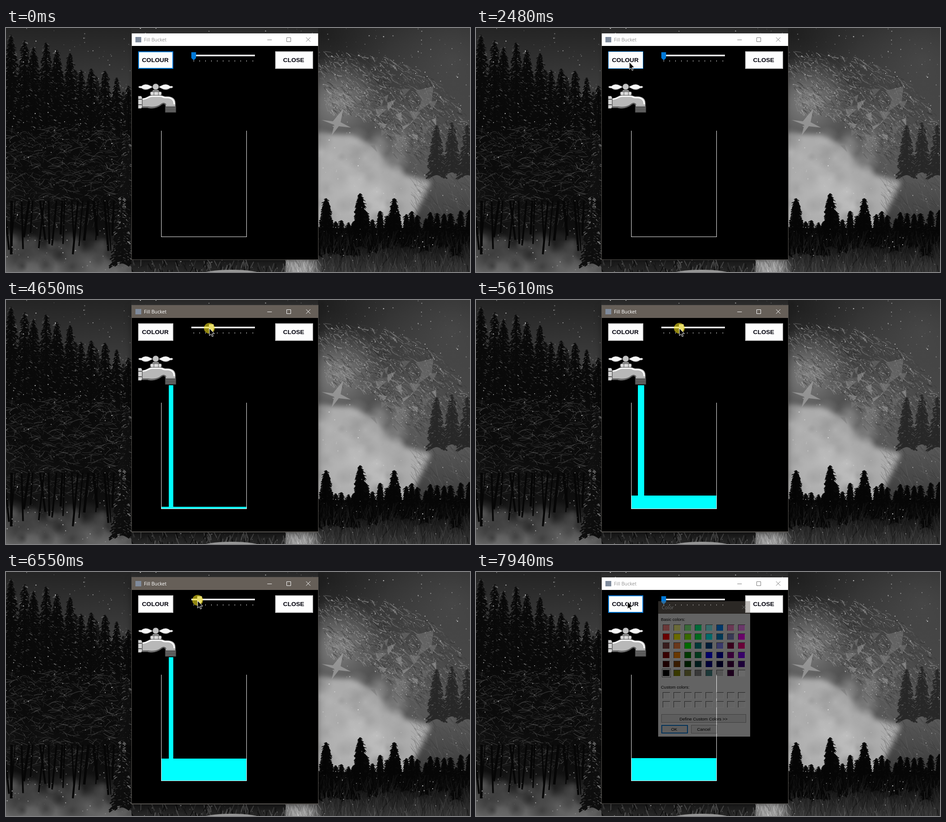
Recreate the animation shown at these times as an HTML page with a canvas. Size 1029 px wide and 544 px high, loop 8000 ms.

```html
<!DOCTYPE html>
<html lang="en">
<head>
<meta charset="utf-8">
<title>Fill Bucket</title>
<style>
html, body { margin: 0; width: 100%; height: 100%; overflow: hidden; background: #222; }
canvas, svg { position: absolute; left: 0; top: 0; width: 1029px; height: 544px; }
#shade { position: absolute; left: 278px; top: 12px; width: 414px; height: 504px; }
.cap { font: 10.7px "Open Sans", sans-serif; }
.btn { font: bold 13.6px "Liberation Sans", Arial, sans-serif; text-anchor: middle; fill: #00000c; }
.dlg { font: 9.5px "Liberation Sans", Arial, sans-serif; }
.mid { text-anchor: middle; }
.crisp { shape-rendering: crispEdges; }
</style>
</head>
<body>
<canvas id="scene" width="1029" height="544"></canvas>
<div id="shade"></div>
<svg viewBox="0 0 1029 544">
  <g class="crisp">
    <rect id="frame" x="278" width="415" fill="#55524e"/>
    <rect x="279" y="40" width="413" height="476"/>
    <rect id="bar" x="279" y="12" width="413" height="28"/>
  </g>
  <rect x="287" y="20" width="13" height="12" fill="#7f8b9c"/>
  <text id="title" class="cap" x="306" y="30">Fill Bucket</text>
  <path id="icons" fill="none" d="M579.5 26.5h10M622.5 21.5h9v9h-9zM665.5 21l9.5 9.5M675 21l-9.5 9.5"/>

  <g class="crisp">
    <rect x="293" y="52" width="78" height="39" fill="#fdfdfd"/>
    <rect id="edge" fill="none"/>
    <rect x="598" y="53" width="82" height="37" fill="#fdfdfd" stroke="#d2d2d2" stroke-width="2"/>
  </g>
  <text class="btn" x="331" y="76">COLOUR</text>
  <text class="btn" x="638" y="76">CLOSE</text>

  <rect x="411" y="59.5" width="141" height="3.6" fill="#e9e9ea"/>
  <path id="ticks" class="crisp" stroke="#c8c8c8"/>
  <path id="thumb" d="M-5 54H5.5V67L.25 72 -5 67Z"/>

  <g stroke="#2c2c2c" stroke-width=".8">
    <g id="lobe" fill="#f6f6f6">
      <path d="M293 131.5Q296 128 300 129.5Q309 122 320 128.5L326 131.5L320 134.5Q309 141 300 134Q296 135 293 131.5Z"/>
      <path d="M300 134Q309 138 320 134.5Q309 141 300 134Z" fill="#aaa" stroke="none"/>
    </g>
    <use href="#lobe" transform="matrix(-1 0 0 1 664 0)"/>
    <path d="M326 138h12l3 5h-18z" fill="#999"/>
    <circle cx="332" cy="131" r="7" fill="#c4c4c4"/>
    <path d="M302 157C312 157 314 151 322 150H343C348 150 350 153 356 152.5C370 152 376 158 376 168V176H354C354 169 349 167 344 172C334 180 320 180 314 178H302Z" fill="#b8b8b8"/>
    <path d="M303 158.500C314 158 316 152.500 324 152H342C348 153 350 156 356 155C367 155 373 160 373 170" fill="none" stroke="#fff" stroke-width="3"/>
    <path d="M303 176H315C326 178 338 176 344 170Q350 165 355 171" fill="none" stroke="#555" stroke-width="2"/>
    <rect x="320" y="142" width="25" height="8" rx="2" fill="#dcdcdc"/>
    <path d="M328 142v8M338 142v8"/>
    <path d="M293 151.5h7l2 4v21l-2 3h-7z" fill="#d4d4d4"/>
    <path d="M293 159h8M293 171h8" stroke-width="1.5"/>
    <rect x="353" y="175" width="24" height="13" fill="#808080"/>
    <path d="M353 178h24M353 181.5h24M353 185h24" stroke-width="1.3"/>
  </g>

  <g class="crisp">
    <path d="M344.5 229V465.5H533.5V229" fill="none" stroke="#f0f0f0"/>
    <rect id="water" x="345" width="188" fill="#0ff"/>
    <rect id="stream" y="190" fill="#0ff"/>
  </g>

  <g id="dialog">
    <rect class="crisp" x="404" y="65" width="204" height="302" fill="#f0f0f0"/>
    <rect class="crisp" x="404" y="65" width="204" height="28" fill="#68625a"/>
    <text class="cap" x="412" y="83" fill="#fff">Color</text>
    <path d="M590 74.5l8 8M598 74.5l-8 8" stroke="#fff"/>
    <text class="dlg" x="410" y="109">Basic colors:</text>
    <text class="dlg" x="410" y="260">Custom colors:</text>
    <g id="swatches" class="crisp"></g>
    <rect class="crisp" x="412.5" y="215.5" width="19" height="19" fill="none" stroke="#000" stroke-dasharray="1 1"/>
    <g fill="#e1e1e1" stroke="#999">
      <rect x="411.5" y="317.5" width="187" height="18"/>
      <rect x="412" y="342" width="57" height="17" stroke="#0078d7" stroke-width="2"/>
      <rect x="477.5" y="341.5" width="57" height="18"/>
    </g>
    <g class="dlg mid">
      <text x="504.5" y="330.5">Define Custom Colors &gt;&gt;</text>
      <text x="439.5" y="354">OK</text>
      <text x="505" y="354">Cancel</text>
    </g>
  </g>

  <circle id="press" r="12" fill="rgb(255,236,30)" fill-opacity=".57"/>
  <path id="cursor" d="M0 0V16.5L3.7 13 6.2 18.7 8.7 17.6 6.2 12.1H11.3Z" stroke="#fff"/>
</svg>
<script>
const $ = id => document.getElementById(id);
const set = (id, attrs) => {
  for (const k in attrs) $(id).setAttribute(k, attrs[k]);
};
const show = (id, on) => { $(id).style.display = on ? '' : 'none'; };

// ---------- wallpaper ----------
const g = $('scene').getContext('2d');
let seed = 11;
function rnd(a = 0, b = 1) {
  seed = (seed + 0x6D2B79F5) | 0;
  let r = Math.imul(seed ^ seed >>> 15, 1 | seed);
  r = r + Math.imul(r ^ r >>> 7, 61 | r) ^ r;
  return a + (b - a) * ((r ^ r >>> 14) >>> 0) / 4294967296;
}
const gray = (v, a = 1) => `rgba(${v | 0},${v | 0},${v | 0},${a})`;
const times = (n, fn) => { for (let i = 0; i < n; i++) fn(i); };

function fade(x, y, w, h, tones) {
  const f = g.createLinearGradient(0, y, 0, y + h);
  tones.forEach((v, i) => f.addColorStop(i / (tones.length - 1), gray(v)));
  g.fillStyle = f;
  g.fillRect(x, y, w, h);
}
function glow(x, y, r, v, a) {
  const f = g.createRadialGradient(x, y, 0, x, y, r);
  f.addColorStop(0, gray(v, a));
  f.addColorStop(1, gray(v, 0));
  g.fillStyle = f;
  g.fillRect(x - r, y - r, 2 * r, 2 * r);
}
function line(x, y, dx, dy, bend, style, w) {
  g.strokeStyle = style;
  g.lineWidth = w;
  g.beginPath();
  g.moveTo(x, y);
  g.quadraticCurveTo(x + dx / 2, y + dy / 2 + bend, x + dx, y + dy);
  g.stroke();
}
function poly(pts, style) {
  g.fillStyle = style;
  g.beginPath();
  for (let i = 0; i < pts.length; i += 2) g.lineTo(pts[i], pts[i + 1]);
  g.fill();
}
function dot(x, y, r, style) {
  g.fillStyle = style;
  g.beginPath();
  g.arc(x, y, r, 0, 7);
  g.fill();
}
// dark drooping boughs with flecks of snow up to tone hi
function fir(x, top, h, w, lo, hi) {
  poly([x, top, x + w * .7, top + h, x - w * .7, top + h], gray(lo));
  for (let y = 0; y < h; y += 2) {
    const half = 1.5 + w * Math.pow(y / h, .65) * rnd(.5, 1.05);
    for (const s of [-1, 1]) {
      line(x, top + y, s * half, half * .5, -half * .15, gray(lo), 3);
      const k = rnd(.05, .85), v = lo + (hi - lo) * rnd() ** 1.6;
      line(x + s * half * k, top + y + half * k * .4, s * rnd(2, 7), rnd(1, 6), -1, gray(v), rnd(.8, 2));
    }
  }
}

function paintForest() {
  fade(0, 0, 620, 544, [36, 56, 72, 30, 22, 26]);
  times(12, i => fir(110 + i * 15, 95 + i * 4 + rnd(-15, 20), 190, 26, 18, 90));
  times(11, i => {
    const x = 268 - i * 25.5 + rnd(-4, 4);
    fir(x, Math.max(6, 12 + x * .42 + rnd(-18, 18)), 290, 40, 10, 112);
  });
  times(50, () => glow(rnd(0, 250), rnd(270, 430), 55, 12, .55));
  times(750, () => line(rnd(0, 255), rnd(225, 440), rnd(-28, 28), rnd(-16, 12), rnd(-9, 5),
    gray(rnd(45, 135), .6), rnd(.4, 1)));
  fade(0, 474, 278, 70, [26, 66, 92, 104]);
  times(60, () => glow(rnd(0, 270), rnd(470, 544), rnd(10, 35), rnd(10, 140), .4));
  times(22, i => line(i * 12 + rnd(-5, 5), 385, rnd(-12, 12), rnd(70, 120), 0, gray(6), rnd(2, 6)));
  fir(268, 235, 150, 22, 16, 135);
  fir(257, 375, 150, 27, 14, 190);
  fade(278, 516, 345, 28, [22, 40]);
  times(110, () => line(rnd(278, 620), rnd(514, 540), rnd(-8, 8), 14, 0, gray(rnd(8, 85)), 2));
  g.fillStyle = gray(150);
  g.beginPath();
  g.ellipse(500, 549, 65, 10, 0, 0, 7);
  g.fill();
}

function paintNight() {
  fade(620, 0, 409, 544, [48, 60, 72, 88, 62, 40]);
  glow(700, 10, 150, 22, .7);
  glow(990, 70, 150, 92, .4);
  glow(735, 165, 105, 165, .65);
  glow(890, 230, 100, 112, .5);
  // swirling fur, brightest at its left end
  times(1300, () => {
    const a = rnd(-1.75, 0), r = 160 + rnd(-65, 75), far = (a + 1.75) / 1.75;
    const x = 735 + r * Math.cos(a) * 1.3, y = 285 + r * Math.sin(a);
    line(x, y, rnd(4, 16), rnd(2, 14), rnd(-4, 3), gray(rnd(30, 215 - 75 * far), .45), rnd(.5, 2));
    if (rnd() < .5) dot(x + rnd(-9, 9), y + rnd(-9, 9), rnd(.3, 1.2), gray(rnd(130, 225), .7));
  });
  g.filter = 'blur(6px)';
  poly([670, 235, 765, 238, 822, 268, 862, 322, 942, 342, 925, 380, 890, 450, 670, 450], gray(172));
  g.filter = 'none';
  times(80, () => glow(rnd(690, 880), rnd(245, 430), rnd(10, 32), rnd(115, 215), .35));
  glow(775, 365, 85, 195, .55);
  poly([700, 205, 725, 208, 748, 180, 742, 210, 765, 222, 738, 219, 722, 240, 728, 216], gray(165, .7));
  poly([908, 140, 948, 130, 944, 165, 912, 188, 922, 160], gray(115, .6));
  times(22, () => {
    const x = rnd(800, 945), y = rnd(120, 310);
    poly([x, y, x + rnd(6, 26), y + rnd(-9, 9), x + rnd(0, 16), y + rnd(7, 22)], gray(rnd(90, 175), .5));
  });
  times(300, () => line(rnd(895, 1020), rnd(235, 400), rnd(5, 24), rnd(8, 28), -3, gray(rnd(35, 130), .35), 1));
  times(3, i => fir(955 + i * 34, 218 - i % 2 * 6, 110, 24, 40, 110));
  fade(692, 446, 337, 98, [8, 14, 36, 54]);
  times(26, i => fir(690 + i * 14 + rnd(-4, 4), rnd(405, 440), 70, 14, 7, 20));
  times(3, i => fir(710 + i * 75.5, i === 1 ? 370 : 381, 95, 23, 6, 18));
  times(700, () => {
    const y = rnd(450, 535);
    line(rnd(690, 1029), y, rnd(-10, 8), rnd(10, 30), 0, gray(rnd(10, 20 + (y - 440)), .5), rnd(.6, 1.8));
  });
  glow(650, 540, 55, 215, .9);
  times(120, () => line(rnd(618, 690), rnd(512, 535), rnd(-8, 12), rnd(12, 28), 0, gray(rnd(95, 215), .5), 1.3));
}

paintForest();
g.save();
g.beginPath();
g.rect(620, 0, 409, 544);
g.clip();
paintNight();
g.restore();
fade(278, 0, 414, 12, [38, 48]);
times(1000, () => dot(rnd(0, 1029), rnd(0, 544), rnd(.35, 1.3), gray(rnd(150, 245), rnd(.25, .9))));

// ---------- controls ----------
const tick = 13.1;
let d = '';
times(11, i => { d += `M${Math.floor(416 + i * tick) + .5} 72v3`; });
set('ticks', { d });

const basic = `f88 ff8 8f8 0f8 8ff 08f f8c f8f f00 ff0 8f0 0f4 0ff 08c 88c f0f
844 f84 0f0 088 048 88f 804 f08 800 f80 080 084 00f 00a 808 80f
400 840 040 044 008 004 404 408 000 880 884 888 488 ccc 404 fff`.split(/\s+/);
function swatch(i, y, fill) {
  const x = Math.round(414 + (i % 8) * 23.8);
  return `<rect x="${x}" y="${y}" width="15" height="14" fill="#${fill}"/>` +
    `<path d="M${x + .5} ${y + 14}v-13.5h15" fill="none" stroke="#555"/>` +
    `<path d="M${x} ${y + 14.5}h15.5v-14" fill="none" stroke="#fff"/>`;
}
$('swatches').innerHTML =
  basic.map((c, i) => swatch(i, Math.round(117 + (i >> 3) * 20.2), c)).join('') +
  Array.from({ length: 16 }, (_, i) => swatch(i, 268 + (i >> 3) * 20, 'f0f0f0')).join('');

// ---------- motion ----------
const beat = 77;
// start, end, x, y reached
const moves = [
  [410, 410, 683, 357], [480, 480, 607, 308], [1170, 1410, 467, 118],
  [1710, 2480, 340, 76], [2560, 3090, 408, 67], [3260, 3490, 416, 65],
  [4040, 4650, 451, 63], [5850, 5920, 447, 63], [6070, 6470, 425, 64],
  [6630, 6860, 411, 64], [7010, 7170, 402, 66], [7320, 7470, 336, 66]
];
// time, water level
const levels = [[4490, 465], [4650, 461], [4890, 453], [5850, 430], [6550, 416], [6710, 415]];

function pointer(t) {
  let x = 683, y = 357;
  for (const [a, b, ex, ey] of moves) {
    if (t < a) break;
    const n = Math.round((b - a) / beat) + 1;
    const gap = (b - a) / (n - 1) || 1;
    const k = Math.min(n, Math.floor((t - a) / gap + .02) + 1) / n;
    x += (ex - x) * k;
    y += (ey - y) * k;
  }
  return [Math.round(x), Math.round(y)];
}

function waterLevel(t) {
  const start = levels[0][0], step = 79;
  const s = start + Math.floor((t - start) / step) * step;
  let [pt, level] = levels[0];
  for (const [at, to] of levels) {
    if (s > pt) level += (to - level) * Math.min(1, (s - pt) / (at - pt || 1));
    pt = at;
  }
  return Math.round(level);
}

const dragging = t => t >= 3870 && t < 6860;
const slider = t => dragging(t) ? Math.max(0, Math.round((pointer(t)[0] - 416) / tick)) : 0;

function draw(t) {
  const within = (a, b) => t >= a && t < b;
  const [x, y] = pointer(t);
  const active = within(3870, 7870);
  const drag = dragging(t);

  set('frame', { y: active ? 11 : 12, height: active ? 507 : 505 });
  $('shade').style.boxShadow = active ? '0 5px 15px rgba(0,0,0,.38)' : '0 2px 7px rgba(0,0,0,.25)';
  set('bar', { fill: active ? '#665f58' : '#fff' });
  set('title', { fill: active ? '#fff' : '#959595' });
  set('icons', { stroke: active ? '#fff' : '#777' });

  const focus = t < 3870 || t >= 7700;
  const hover = t < 7700 && x > 292 && x < 372 && y > 51 && y < 91;
  const w = hover ? 1 : 2;
  set('edge', {
    x: 293 + w / 2, y: 52 + w / 2, width: 78 - w, height: 39 - w,
    stroke: focus || hover ? '#0078d7' : '#d2d2d2', 'stroke-width': w
  });

  const over = within(3260, 3870) || within(6860, 7010);
  set('thumb', {
    transform: `translate(${416 + Math.round(slider(t) * tick)} 0)`,
    fill: drag ? '#ccc' : over ? '#171717' : '#0078d7'
  });

  // the tap answers the slider a little late
  const flow = slider(t - 240), wide = flow && 8 + 2 * flow;
  const level = waterLevel(t);
  set('water', { y: level, height: 465 - level });
  set('stream', { x: 366 - Math.ceil(wide / 2), width: wide, height: level - 190 });

  show('press', drag || within(7700, 7870));
  set('press', { cx: x, cy: drag ? 63 : y });
  show('cursor', t >= 410);
  set('cursor', { transform: `translate(${x} ${y})` });

  show('dialog', t >= 7870);
  set('dialog', { opacity: t < 7940 ? .18 : .41 });
}

function loop() {
  draw(performance.now() % 8000);
  requestAnimationFrame(loop);
}
loop();
</script>
</body>
</html>
```
